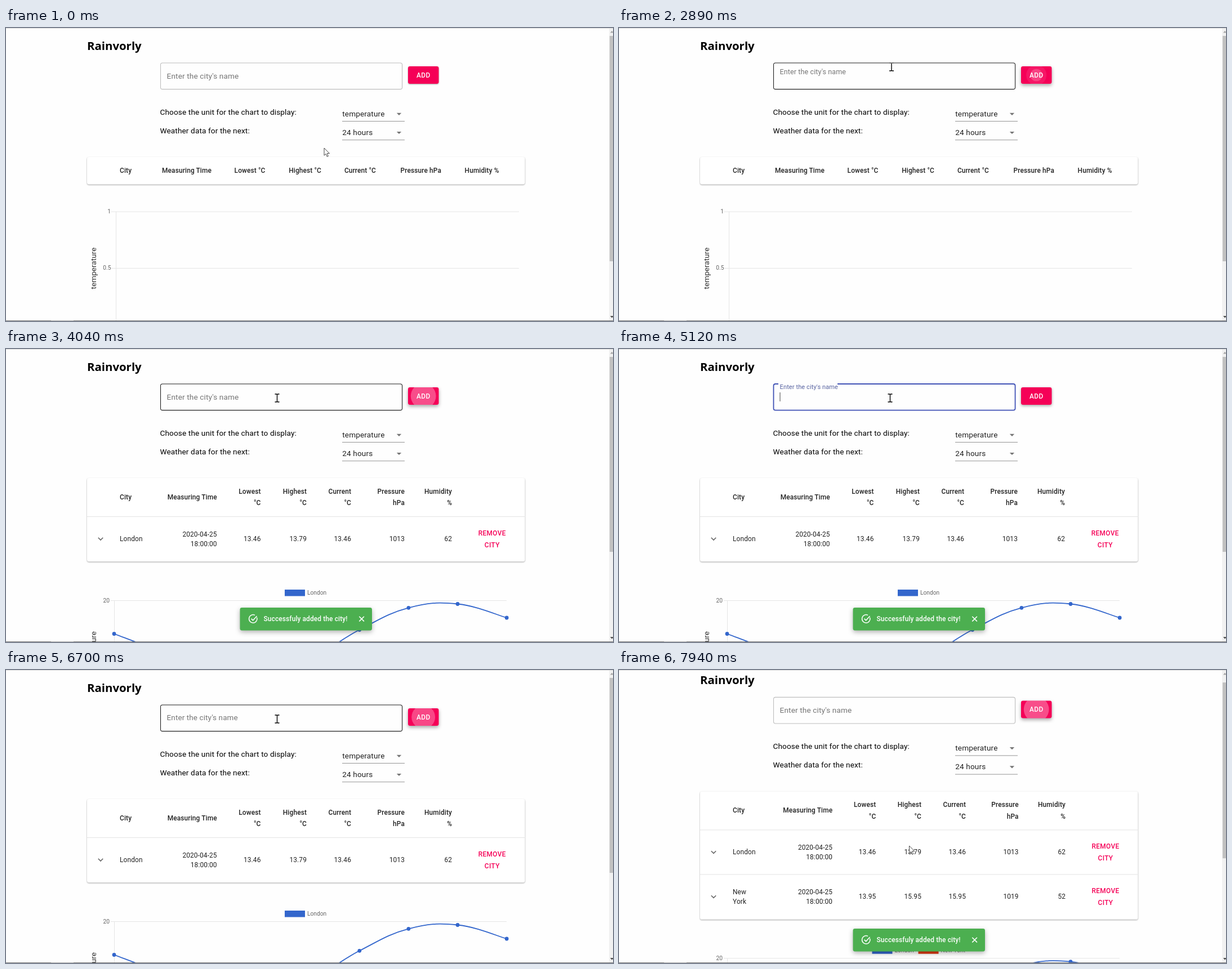
Animation of 1078 by 520 pixels, one loop 8000 ms. Source, as an HTML page:

```html
<!DOCTYPE html>
<html lang="en">
<head>
<meta charset="utf-8">
<title>Rainvorly</title>
<style>
  html, body { margin: 0; width: 100%; height: 100%; overflow: hidden; background: #fefefe; }
  svg { display: block; }
  text { font-family: Roboto, sans-serif; white-space: pre; }
  .title { font: 700 20.4px "Open Sans", "Noto Sans", sans-serif; }
  .body { font-size: 13.6px; letter-spacing: .00938em; }
  .cell { font-size: 11.9px; letter-spacing: .01071em; fill: rgba(0,0,0,.87); }
  .head { font-weight: 500; }
  .btn { font-size: 11.9px; font-weight: 500; letter-spacing: .02857em; }
  .tick { font-size: 10.2px; fill: #666; }
  .axis { font-size: 13.6px; fill: #333; }
  .paper { fill: #fff; filter: drop-shadow(0 1px 1px rgba(0,0,0,.36)); }
  .beam { mix-blend-mode: difference; }
  .glow { mix-blend-mode: multiply; }
</style>
</head>
<body>
<svg id="stage" width="1078" height="520" viewBox="0 0 1078 520"></svg>
<script>
const LOOP = 8000;
const RED = '#f50057', BLUE = '#3366cc', ORANGE = '#dc3912', INDIGO = '#3f51b5';

// ---------- markup helpers ----------
const text = (x, y, s, cls, extra = '') => `<text x="${x}" y="${y}" class="${cls}" ${extra}>${s}</text>`;
const END = 'text-anchor="end"', MID = 'text-anchor="middle"';
const rect = (x, y, w, h, extra) => `<rect x="${x}" y="${y}" width="${w}" height="${h}" ${extra}/>`;
const line = (x1, y1, x2, y2, color, w = 1) =>
  `<path d="M${x1} ${y1}L${x2} ${y2}" stroke="${color}" stroke-width="${w}" fill="none"/>`;
const paper = h => rect(144, 229, 777.5, h, 'rx="3.4" class="paper"');
const axisTitle = (x, y) => text(0, 0, 'temperature', 'axis', `${MID} transform="translate(${x} ${y}) rotate(-90)"`);

function select(y, value) {
  return text(597.3, y, value, 'body', 'fill="rgba(0,0,0,.87)"') +
    line(597, y + 9, 708, y + 9, 'rgba(0,0,0,.42)') +
    `<path d="M693.8 ${y - 5.8}h8.4l-4.2 4.2z" fill="rgba(0,0,0,.54)"/>`;
}

const HEADS = ['Lowest °C', 'Highest °C', 'Current °C', 'Pressure hPa', 'Humidity %'];

function emptyView() {
  const ends = [460.5, 560, 657, 773, 875.5];
  return paper(48.5) +
    text(202, 257, 'City', 'cell head') + text(365, 257, 'Measuring Time', 'cell head', END) +
    HEADS.map((h, i) => text(ends[i], 257, h, 'cell head', END)).join('') +
    line(187, 326, 911, 326, '#e5e5e5') + line(187, 426.5, 911, 426.5, '#e5e5e5') +
    line(195.5, 326, 195.5, 520, '#e5e5e5') +
    text(186, 329, '1', 'tick', END) + text(186.5, 429, '0.5', 'tick', END) + axisTitle(160, 426.5);
}

function cityRow(top, city, values, ends, timeEnd, action) {
  const mid = top + 43.5;
  const names = city.split(' ');
  const first = names.length > 1 ? mid - 4.5 : mid;
  return `<path d="M163.8 ${mid - 6.2}l4.2 4.2 4.2-4.2" fill="none" stroke="#666" stroke-width="1.6"/>` +
    names.map((n, i) => text(202, first + i * 17 - (names.length > 1 ? 4 : 0), n, 'cell')).join('') +
    text(timeEnd, mid - 8.5, '2020-04-25', 'cell', END) + text(timeEnd, mid + 8.5, '18:00:00', 'cell', END) +
    values.map((v, i) => text(ends[i], mid, v, 'cell', END)).join('') +
    text(action, mid - 10, 'REMOVE', 'btn', `${MID} fill="${RED}"`) +
    text(action, mid + 10.5, 'CITY', 'btn', `${MID} fill="${RED}"`);
}

function tableView(rows, ends, timeEnd, action) {
  let s = paper(69 + rows.length * 79.2) +
    text(202, 267, 'City', 'cell head') + text(timeEnd, 267, 'Measuring Time', 'cell head', END);
  HEADS.forEach((h, i) => h.split(' ').forEach((word, j) => {
    s += text(ends[i], 257 + j * 20.3, word, 'cell head', END);
  }));
  rows.forEach(([city, ...values], i) => {
    const top = 297.5 + i * 79;
    s += line(144, top, 921, top, '#e3e3e3') + cityRow(top, city, values, ends, timeEnd, action);
  });
  return s;
}

// Smooth curve through equally spaced points
function curve(ys, color) {
  const pts = ys.map((y, i) => [192 + i * 87.15, y]);
  const at = i => pts[Math.max(0, Math.min(pts.length - 1, i))];
  let d = `M${pts[0]}`;
  for (let i = 0; i < pts.length - 1; i++) {
    const [a, p, q, b] = [at(i - 1), at(i), at(i + 1), at(i + 2)];
    const k = .2;
    d += `C${p[0] + (q[0] - a[0]) * k} ${p[1] + (q[1] - a[1]) * k} ` +
      `${q[0] - (b[0] - p[0]) * k} ${q[1] - (b[1] - p[1]) * k} ${q}`;
  }
  return `<path d="${d}" fill="none" stroke="${color}" stroke-width="1.8"/>` +
    pts.map(([x, y]) => `<circle cx="${x}" cy="${y}" r="3.4" fill="${color}"/>`).join('');
}

const legend = (x, name, color) => rect(x, 427, 36, 11.5, `fill="${color}"`) + text(x + 40, 436, name, 'tick');

function chart(dy, legends) {
  return `<g transform="translate(0 ${dy})">` + legends +
    line(186, 446.5, 889, 446.5, '#e5e5e5') + line(192.5, 446.5, 192.5, 640, '#e5e5e5') +
    text(184, 450, '20', 'tick', END) + axisTitle(160, 538) +
    curve([505.5, 537, 560, 572, 549, 498.3, 459.3, 452.5, 477], BLUE) + '</g>';
}

const london = ['London', '13.46', '13.79', '13.46', '1013', '62'];
const newYork = ['New York', '13.95', '15.95', '15.95', '1019', '52'];
const views = [
  emptyView(),
  tableView([london], [452.5, 534, 613, 708, 792], 374.7, 863.3) +
    chart(0, legend(495, 'London', BLUE)),
  tableView([london, newYork], [456.3, 537, 616, 709.7, 793], 379.2, 864) +
    chart(78.8, legend(449.5, 'London', BLUE) + legend(531.5, 'New York', ORANGE))
];

document.getElementById('stage').innerHTML = `
  <clipPath id="btnClip">${rect(714, 68, 54.5, 31, 'rx="3.4"')}</clipPath>
  ${rect(0, 0, 1078, 520, 'fill="#fefefe"')}
  <g id="page">
    ${text(144, 39, 'Rainvorly', 'title')}
    <path id="border" fill="none"/>
    <text id="label" class="body" y="11.4">Enter the city's name</text>
    <text id="typed" class="body" x="285.6" y="89.8" fill="rgba(0,0,0,.87)"></text>
    ${rect(285.5, 77, 1, 16, 'id="caret" fill="#444"')}
    ${rect(714, 68, 54.5, 31, `id="btn" rx="3.4" fill="${RED}"`)}
    <g clip-path="url(#btnClip)" fill="#fff">
      <circle id="ripA" cx="741.2" cy="83.5"/><circle id="ripB" cx="741.2" cy="83.5"/>
    </g>
    ${text(741.3, 87.8, 'ADD', 'btn', `${MID} fill="#fff"`)}
    ${text(273.5, 153.5, 'Choose the unit for the chart to display:', 'body')}
    ${text(273.5, 187, 'Weather data for the next:', 'body')}
    ${select(156.5, 'temperature')}${select(189.7, '24 hours')}
    ${views.map((v, i) => `<g id="view${i}">${v}</g>`).join('')}
  </g>
  <g id="snack">
    ${rect(415.5, 459, 234.5, 40.5, 'rx="3.4" fill="#4caf50" style="filter:drop-shadow(0 3px 4px rgba(0,0,0,.3))"')}
    <path d="M445.6 476.6a7.2 7.2 0 1 1-3.6-4.2M435.6 478.6l3 3 7-7.6" fill="none" stroke="#fff" stroke-width="1.5"/>
    ${text(457.5, 483, 'Successfuly added the city!', 'cell head', 'style="fill:#fff"')}
    <path d="M627.3 474.8l8.6 8.6m0-8.6l-8.6 8.6" stroke="#fff" stroke-width="1.6"/>
  </g>
  ${rect(1071, 0, 7, 520, 'fill="#f1f1f1"')}
  ${rect(1072, 14, 6, 400, 'id="thumb" fill="#c1c1c1"')}
  <path d="M1073 8.5h6l-3-3.5z" fill="#a3a3a3"/><path d="M1073 511h6l-3 3.5z" fill="#505050"/>
  ${rect(0, 0, 1078, 1, 'fill="#dcdcdc"')}
  ${rect(0, 519, 1078, 1, 'fill="#757575"')}${rect(80, 519, 40, 1, 'fill="#a8a8a8"')}
  <path id="beam" class="beam" d="M-4 -7h3l1 1 1-1h3M0 -6V6M-4 7h3l1-1 1 1h3" fill="none" stroke="#fff" stroke-width="1.4"/>
  <circle id="glow" class="glow" r="10" fill="#fbf23c"/>
  <path id="arrow" d="M0 0V13.2L3 10.4 5.2 15.3 7.3 14.4 5.2 9.6H9.4Z" fill="#fff" stroke="#333" stroke-width=".9"/>`;

// ---------- motion ----------
const el = {};
document.querySelectorAll('svg [id]').forEach(e => el[e.id] = e);
const set = (e, attrs) => { for (const k in attrs) e.setAttribute(k, attrs[k]); };
const show = (e, on) => e.setAttribute('display', on ? 'inline' : 'none');
const clamp = v => Math.max(0, Math.min(1, v));
const lerp = (a, b, p) => a + (b - a) * p;

function bezier(x1, x2) {
  return v => {
    if (v <= 0 || v >= 1) return clamp(v);
    let lo = 0, hi = 1;
    for (let i = 0; i < 22; i++) {
      const s = (lo + hi) / 2, r = 1 - s;
      if (3 * r * r * s * x1 + 3 * r * s * s * x2 + s * s * s < v) lo = s; else hi = s;
    }
    return 3 * (1 - lo) * lo * lo + lo ** 3;
  };
}
const easeOut = bezier(0, .2), easeInOut = bezier(.4, .2);
const ramp = (t, from, len, ease = easeOut) => ease((t - from) / len);

const rounds = [
  { focus: 1358, blur: 2630, submit: 2825, second: 2710, stop: 4450, leave: 5040,
    word: 'london', keys: [1790, 1960, 2110, 2260, 2340, 2490], shown: 3210, snack: 3245, hide: 5290 },
  { focus: 5040, blur: 6300, submit: 6558, second: 6380, stop: 9e3, leave: 9e3,
    word: 'new york', keys: [5400, 5570, 5740, 5810, 5980, 6060, 6140, 6290], shown: 7020, snack: 7070, hide: 9e3 }
];

const path = [[0, 565, 213], [660, 565, 213], [760, 558, 183], [890, 558, 183], [1170, 484, 69],
  [3770, 484, 69], [4040, 481.5, 87], [7270, 481.5, 87], [7620, 515.5, 312], [LOOP, 515.5, 312]];

function pointer(t) {
  const i = path.findIndex(p => p[0] > t);
  const a = path[i - 1], b = path[i], p = (t - a[0]) / (b[0] - a[0]);
  return [lerp(a[1], b[1], p), lerp(a[2], b[2], p)];
}

function ripple(e, t, start, exit, pulse) {
  const grow = ramp(t, start, 550, easeInOut);
  const wave = pulse && t > start + 200 ? .04 * (1 - Math.cos((t - start - 200) / 2500 * 2 * Math.PI)) : 0;
  const fade = 1 - ramp(t, exit, 430, easeInOut);
  set(e, { r: 24.3 * grow * (1 - wave), opacity: t < start ? 0 : lerp(.1, .3, grow) * fade });
}

function drawBorder(gap, color, w) {
  const x = 274.5, r = 703.6, y = 62, b = 108.6, c = 3.4;
  set(el.border, {
    d: `M${283 + gap} ${y}H${r - c}Q${r} ${y} ${r} ${y + c}V${b - c}Q${r} ${b} ${r - c} ${b}` +
      `H${x + c}Q${x} ${b} ${x} ${b - c}V${y + c}Q${x} ${y} ${x + c} ${y}H283`,
    stroke: color, 'stroke-width': w
  });
}

function render(t) {
  const r = t < rounds[1].focus ? rounds[0] : rounds[1];
  const focused = t >= r.focus && t < r.blur;
  const filled = t >= r.focus && t < r.submit;
  const [mx, my] = pointer(t);
  const inField = mx > 274 && mx < 704 && my > 61 && my < 109;

  // text field
  const shrink = ramp(t, r.focus, 200) - ramp(t, r.submit, 200);
  const tint = ramp(t, r.focus, 200) - ramp(t, r.blur, 200);
  const mix = (a, b) => Math.round(lerp(a, b, tint));
  set(el.label, {
    transform: `translate(285.6 ${lerp(78.4, 56.8, shrink)}) scale(${lerp(1, .75, shrink)})`,
    fill: `rgba(${mix(0, 63)},${mix(0, 81)},${mix(0, 181)},${lerp(.54, .9, tint)})`
  });
  const gap = filled ? 105 * clamp((t - r.focus - 51) / 12) : 105 * clamp(1 - (t - r.submit) / 50) * (t >= r.submit);
  drawBorder(gap, focused ? INDIGO : inField ? '#212121' : '#bdbdbd', focused ? 1.8 : 1.1);
  el.typed.textContent = filled ? r.word.slice(0, r.keys.filter(k => t >= k).length) : '';
  show(el.caret, focused);
  if (focused) el.caret.setAttribute('x', 285.5 + el.typed.getComputedTextLength());

  // button
  const lift = ramp(t, r.blur, 250, easeInOut) - ramp(t, r.leave, 250, easeInOut) +
    (r === rounds[1] ? 1 - ramp(t, rounds[0].leave, 250, easeInOut) : 0);
  el.btn.style.filter = `drop-shadow(0 ${1.2 + 2 * lift}px ${1.3 + 2 * lift}px rgba(0,0,0,.34))`;
  ripple(el.ripA, t, r.blur, r.second, false);
  ripple(el.ripB, t, r.second, r.stop, true);

  // table, chart and page position
  const view = rounds.filter(q => t >= q.shown).length;
  views.forEach((_, i) => show(el['view' + i], i === view));
  const scroll = 13.6 * clamp((t - 7800) / 130);
  set(el.page, { transform: `translate(0 ${-scroll})` });
  set(el.thumb, { y: 14 + scroll * .6, height: [400, 346, 312][view] });

  // message
  const q = t < rounds[1].snack ? rounds[0] : rounds[1];
  const alpha = ramp(t, q.snack, 196, easeInOut) - ramp(t, q.hide, 196, easeInOut);
  const size = lerp(.75, 1, ramp(t, q.snack, 130, easeInOut) - ramp(t, q.hide + 65, 130, easeInOut));
  set(el.snack, {
    opacity: alpha,
    transform: `translate(532.7 479.2) scale(${size}) translate(-532.7 -479.2)`
  });

  // pointer
  show(el.beam, inField);
  show(el.arrow, !inField);
  show(el.glow, (t >= 1320 && t < 1560) || (t >= 5040 && t < 5115));
  [el.beam, el.glow, el.arrow].forEach(e => set(e, { transform: `translate(${mx} ${my})` }));
}

const began = performance.now();
function tick() {
  render((performance.now() - began) % LOOP);
  requestAnimationFrame(tick);
}
tick();
</script>
</body>
</html>
```
